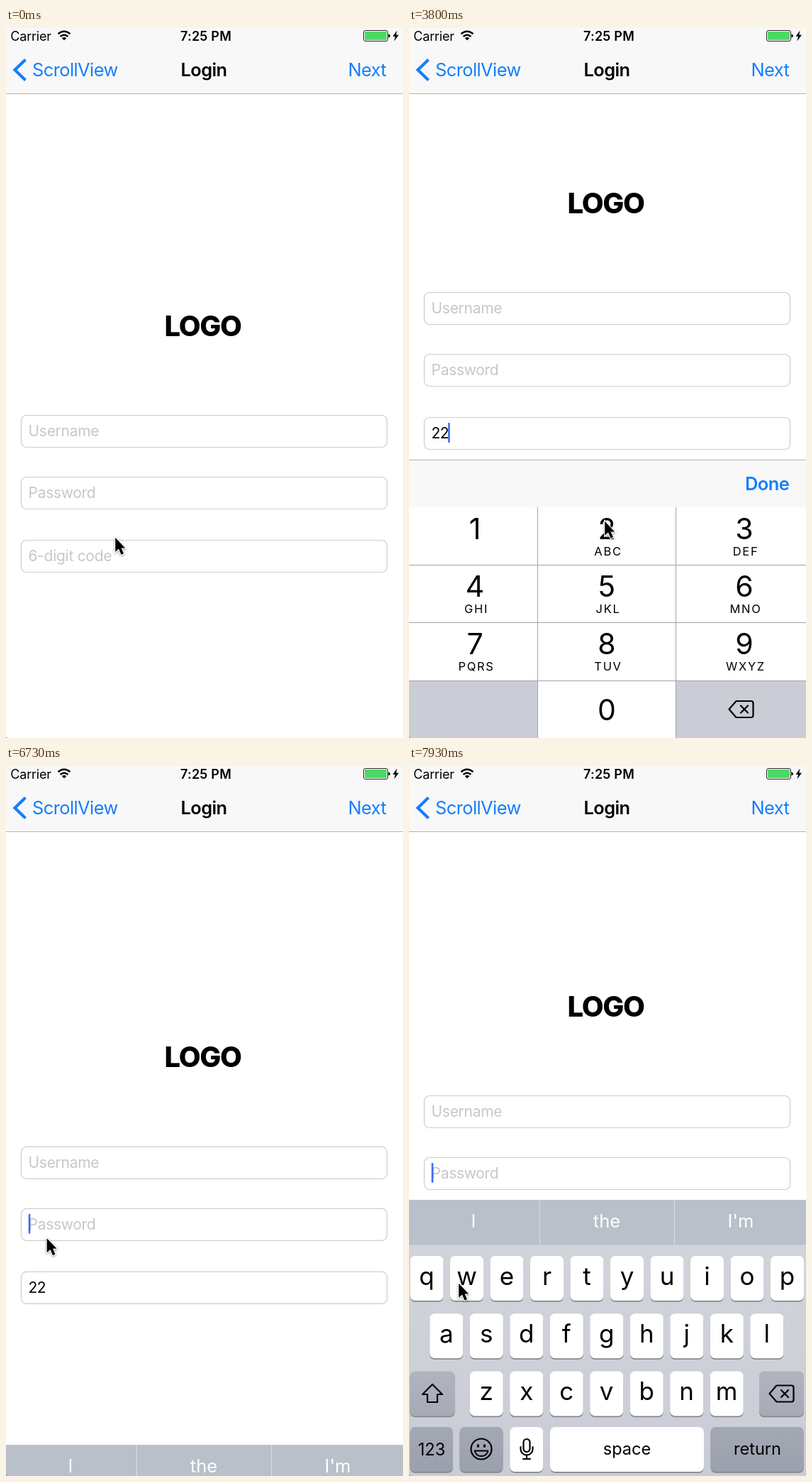
These frames come from a looping animation (560x1000 px, 8 s). An HTML page:

```html
<!DOCTYPE html>
<html lang="en">
<head>
<meta charset="utf-8">
<title>Login form</title>
<style>
  html, body { margin: 0; width: 100%; height: 100%; overflow: hidden; background: #fff; }
  svg { display: block; width: 100vw; height: 100vh; font-family: Inter, "Open Sans", sans-serif; }
  .mid { text-anchor: middle; }
  .bar { font-size: 25.4px; letter-spacing: -.022em; fill: #157efb; }
  .strong { font-weight: 600; }
  .status { font-size: 18px; letter-spacing: -.2px; }
  .clock { letter-spacing: .2px; }
  .logo { font-size: 40px; font-weight: 800; letter-spacing: -1.4px; }
  .hint { font-size: 21px; letter-spacing: -.28px; fill: #c7c7cc; }
  .value { font-size: 21px; letter-spacing: -.5px; }
  .field { fill: #fff; stroke: #cdcdcd; stroke-width: 1.2; }
  .digit { font-size: 41px; }
  .abc { font-size: 16.5px; letter-spacing: 1.7px; }
  .letter { font-size: 35px; }
  .word { font-size: 23.6px; }
  .guess { font-size: 25.5px; fill: #fff; }
  .icon { fill: none; stroke: #000; stroke-width: 2.2; stroke-linejoin: round; stroke-linecap: round; }
  .rule { stroke: #a3a3a6; stroke-width: 1; }
</style>
</head>
<body>
<svg viewBox="0 0 560 1000">
  <defs>
    <linearGradient id="board" x1="0" y1="0" x2="0" y2="1">
      <stop offset="0" stop-color="#d2d5db"/><stop offset="1" stop-color="#c9ccd4"/>
    </linearGradient>
    <linearGradient id="dark" gradientUnits="userSpaceOnUse" x1="0" y1="852" x2="0" y2="994">
      <stop offset="0" stop-color="#afb4be"/><stop offset="1" stop-color="#9aa0ac"/>
    </linearGradient>
    <path id="erase" class="icon" d="M-17 0L-7-11.5H14Q17-11.5 17-8.5V8.5Q17 11.5 14 11.5H-7ZM-.5-5L9.500 5M9.500-5L-.5 5"/>
  </defs>
  <rect width="560" height="1000" fill="#fff"/>

  <g id="form"><text class="logo mid" x="277.500" y="433.500">LOGO</text></g>
  <g id="pad"></g>
  <g id="keys"></g>

  <rect width="560" height="92" fill="#f8f8f8"/>
  <path d="M0 92.500H560" stroke="#b2b2b2"/>
  <text class="status" x="6.300" y="17.500">Carrier</text>
  <path d="M73.500 8.300Q82 1.300 90.500 8.300M76.600 12Q82 7.500 87.400 12" fill="none" stroke="#000" stroke-width="2.500"/>
  <path d="M78.800 14.200Q82 11.800 85.200 14.200L82 17.500Z"/>
  <text class="status clock strong mid" x="282" y="17.500">7:25 PM</text>
  <rect x="504.500" y="3.500" width="34" height="15" rx="2.500" fill="#fff" stroke="#222"/>
  <rect x="506" y="5" width="31" height="12" rx="1" fill="#4cd964"/>
  <path d="M539.500 8.500Q542 9 542 11T539.500 13.500Z"/>
  <path d="M551.500 3.500L545.500 12H549L547.500 18.500L554 9.800H550.300Z"/>
  <path d="M27.500 44.500L12.500 59L27.500 73.500" fill="none" stroke="#157efb" stroke-width="4.200"/>
  <text class="bar" x="37" y="68">ScrollView</text>
  <text class="bar strong mid" x="279" y="68" style="fill:#000">Login</text>
  <text class="bar" x="482.500" y="68">Next</text>
  <path d="M0 997Q0 1000 3 1000H0Z" fill="#777"/>

  <g id="cursor" style="filter:drop-shadow(0 1.500px 1.500px #0006)">
    <path transform="translate(.2 1.800)" d="M0 0V20L4.800 15.800L8.300 24L11.800 22.500L8.400 14.600H14Z" stroke="#fff" stroke-width="2.200" paint-order="stroke"/>
  </g>
</svg>
<script>
const $ = id => document.getElementById(id);
const add = (id, markup) => $(id).insertAdjacentHTML('beforeend', markup);
const text = (cls, x, y, str, id = '') => `<text class="${cls}" x="${x}" y="${y}" id="${id}">${str}</text>`;
const rect = (x, y, w, h, fill, extra = '') =>
  `<rect x="${x}" y="${y}" width="${w}" height="${h}" fill="${fill}" ${extra}/>`;

// Form
const fieldTops = [545.5, 632.5, 721.5];
['Username', 'Password', '6-digit code'].forEach((label, i) => {
  const y = fieldTops[i];
  add('form', `<rect class="field" x="21.5" y="${y}" width="516" height="45" rx="7.5"/>` +
    text('hint', 31.5, y + 29.5, label, 'hint' + i));
});
add('form', text('value', 31.5, fieldTops[2] + 29.5, '', 'value') + rect(0, 0, 2.6, 28, '#426bf2', 'id="caret" rx="1"'));

// Number pad, laid out from its own top edge
const rowH = 81.3, gray = '#cacdd5';
add('pad', rect(0, 0, 560, 67, '#f8f8f8') + '<path d="M0 .5H560" stroke="#b2b2b2"/>' +
  text('bar strong', 474, 43, 'Done', 'done') + rect(0, 67, 560, 330, '#fff') +
  rect(182, 67, 195, rowH, '#fff', 'id="two"') +
  rect(0, 311, 181, 90, gray) + rect(377, 311, 183, 90, gray) +
  '<path class="rule" d="M181.5 67V400M376.5 67V400M0 148.500H560M0 229.500H560M0 311.500H560"/>');
const centers = [93, 279, 473];
['', 'ABC', 'DEF', 'GHI', 'JKL', 'MNO', 'PQRS', 'TUV', 'WXYZ'].forEach((abc, i) => {
  const x = centers[i % 3], y = 67 + rowH * Math.floor(i / 3);
  add('pad', text('digit mid', x, y + 44.5, i + 1) + text('abc mid', x + 2, y + 67.5, abc));
});
add('pad', text('digit mid', 279, 366.500, 0) + '<use href="#erase" x="468.500" y="351.500"/>');

// Letter keyboard
const key = (x, y, w, fill = '#fff') =>
  rect(x, y + 1.8, w, 63, '#85888e', 'rx="7"') + rect(x, y, w, 63, fill, 'rx="7"');
const dark = 'url(#dark)';
add('keys', rect(0, 0, 560, 400, 'url(#board)') + rect(0, 0, 560, 63.5, '#b9c0c9') +
  '<path d="M184.500 0V63.500M374.500 0V63.500" stroke="#dcdfe4"/>');
['I', 'the', "I'm"].forEach((w, i) => add('keys', text('guess mid', [91, 279, 468][i], 38.5, w)));
['qwertyuiop', 'asdfghjkl', 'zxcvbnm'].forEach((row, r) => [...row].forEach((c, i) => {
  const x = [1.5, 29.3, 85.7][r] + 56.5 * i, y = 79 + 81.2 * r;
  add('keys', key(x, y, 47) + text('letter mid', x + 23.5, y + 40.5, c));
}));
add('keys', key(1.5, 241.5, 63, dark) + key(494, 241.5, 63, dark) +
  key(1.5, 320, 60.5, dark) + key(71.5, 320, 61, dark) + key(142.3, 320, 47) +
  key(199, 320, 217) + key(425.5, 320, 131.5, dark) +
  text('word mid', 32, 360, '123') + text('word mid', 307.5, 358.5, 'space') + text('word mid', 491.500, 358.5, 'return') +
  '<use href="#erase" x="525.500" y="273"/>' +
  `<path class="icon" d="M33 260L47 274H40V285H26V274H19Z"/>
   <g transform="translate(102 351)"><circle class="icon" r="14.500" stroke-width="1.800"/>
     <ellipse cx="-4.500" cy="-4.500" rx="1.700" ry="2.600"/><ellipse cx="4.500" cy="-4.500" rx="1.700" ry="2.600"/>
     <path class="icon" d="M-9.500 2.500H9.500Q7.500 10 0 10T-9.500 2.500Z" style="stroke-width:1.800"/></g>
   <g transform="translate(166 351)" class="icon"><rect x="-4.500" y="-14" width="9" height="18" rx="4.500"/>
     <path d="M-8.500-3V0A8.500 8.500 0 0 0 8.500 0V-3M0 8.500V14M-5 14H5"/></g>`);

// Motion
const LOOP = 8000, FRAME = 1000 / 15;
const pointer = [
  [0, 154, 716], [333, 100, 744], [800, 100, 744], [1200, 136, 743], [1667, 136, 743],
  [2067, 483, 643], [2200, 515, 645], [2333, 502, 645], [2533, 502, 645], [3133, 276, 693],
  [3800, 276, 693], [4067, 492, 662], [4200, 512, 650], [4467, 505, 642], [5200, 505, 642],
  [5600, 461, 652], [6267, 49, 666], [6667, 49, 666], [6867, 82, 656], [7733, 82, 656],
  [7933, 70, 727], [8000, 70, 727]
];
const padUp = 950, typed = [3400, 3700], padDown = 4900, keysUp = 6702;
const clamp = v => Math.max(0, Math.min(1, v));
const within = (t, a, b) => t >= a && t < b;

// Critically damped spring
function spring(ms) {
  if (ms <= 0) return 0;
  const x = ms / 1000 * Math.sqrt(1000 / 3);
  return ms > 600 ? 1 : 1 - Math.exp(-x) * (1 + x);
}

// Caret: 540 on, 200 fading out, 330 off, 130 fading in
function blink(ms) {
  const p = ms % 1200;
  return p < 1070 ? 1 - clamp((p - 540) / 200) : (p - 1070) / 130;
}

function pointerAt(t) {
  const i = pointer.findIndex(p => p[0] > t);
  const [t0, x0, y0] = pointer[i - 1], [t1, x1, y1] = pointer[i];
  const u = (t - t0) / (t1 - t0), e = u * u * (3 - 2 * u);
  return [x0 + (x1 - x0) * e, y0 + (y1 - y0) * e];
}

const move = (id, x, y) => $(id).setAttribute('transform', `translate(${x} ${y})`);

function draw(t) {
  const pad = spring(t - padUp) - spring(t - padDown), keys = spring(t - keysUp);
  const keysTop = 1000 - 389 * keys;
  move('form', 0, -173 * pad - 81 * keys);
  move('pad', 0, 1000 - 392 * pad);
  move('keys', 0, keysTop);
  // The shading of the dark keys stays fixed to the screen
  $('dark').setAttribute('gradientTransform', `translate(0 ${-keysTop})`);
  move('cursor', ...pointerAt(t));

  const count = typed.filter(at => t >= at).length;
  $('value').textContent = '2'.repeat(count);
  $('hint2').style.opacity = count ? 0 : 1;
  $('two').setAttribute('fill', typed.some(at => within(t, at - 70, at)) ? gray : '#fff');
  $('done').style.opacity = within(t, 4790, padDown) ? .3 : 1;

  const inCode = within(t, padUp, padDown), inPassword = t >= keysUp;
  const since = inPassword ? keysUp : count ? typed[count - 1] : padUp;
  const caret = $('caret');
  caret.style.opacity = inCode || inPassword ? blink(t - since) : 0;
  caret.setAttribute('x', 31.7 + (inCode ? count * 11.7 : 0));
  caret.setAttribute('y', fieldTops[inPassword ? 1 : 2] + 7.5);
}

const start = performance.now();
function tick() {
  const t = Math.max(0, performance.now() - start) % LOOP;
  draw(Math.min(Math.floor((t + 5) / FRAME), 119) * FRAME);
  requestAnimationFrame(tick);
}
tick();
</script>
</body>
</html>
```
